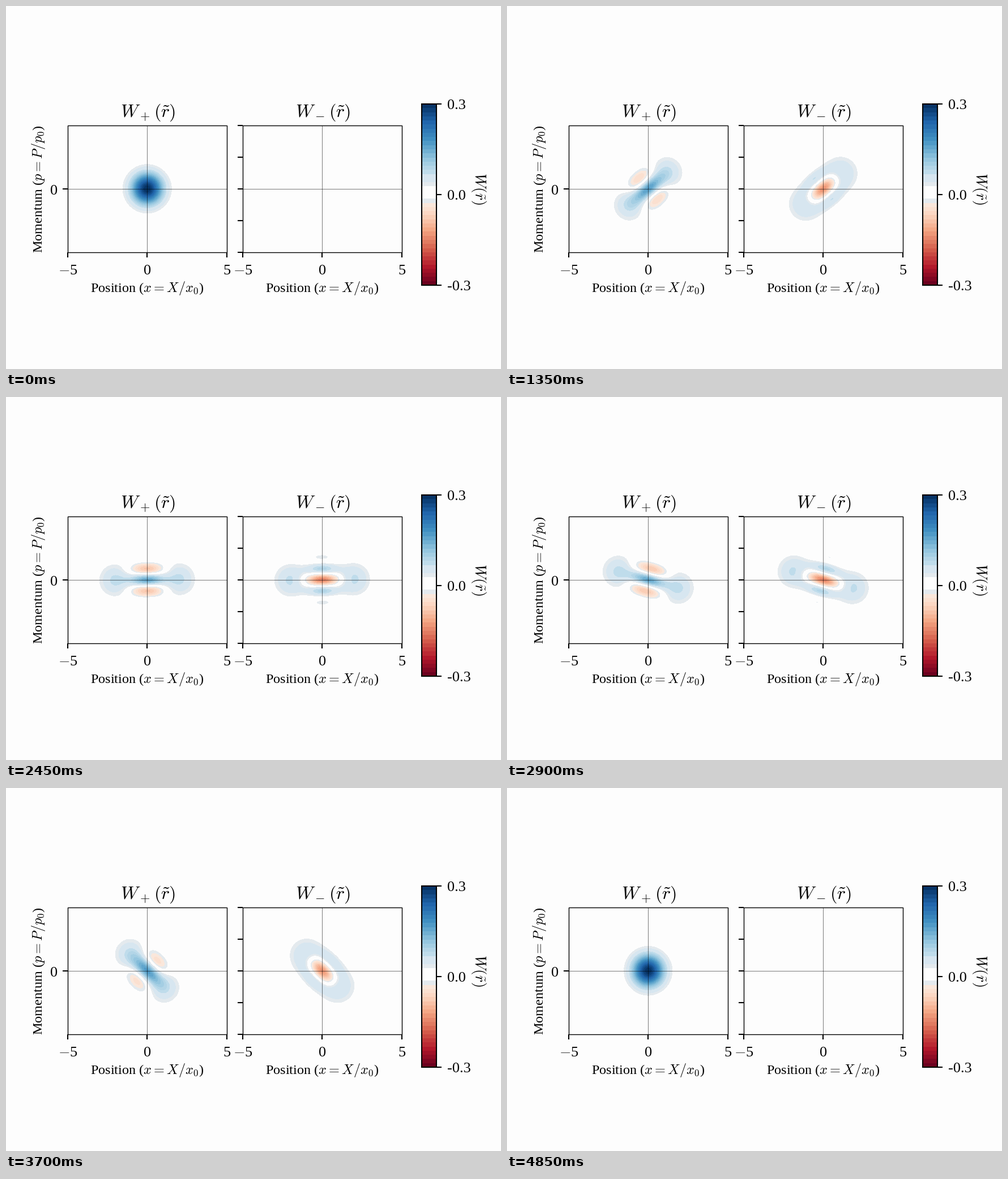
Write a matplotlib script that moves like this. It is 874 by 641 pixels and loops after 5000 ms.

```python
import numpy as np
import matplotlib.pyplot as plt
from matplotlib.animation import FuncAnimation
from matplotlib.patches import Rectangle

WIDTH, HEIGHT, DPI = 874, 641, 100
FRAMES, INTERVAL = 100, 50
PAPER = "#fdfdfd"
PANEL_LEFTS = (109, 418)
TOP, PANEL_W, PANEL_H = 210.9, 280.9, 224.5
MID_Y = TOP + PANEL_H / 2
BAR = dict(left=734, top=173, width=26, height=320)
BANDS = 44
PEAK = 1 / np.pi

plt.rcParams.update({
    "font.family": "Liberation Serif",
    "mathtext.fontset": "cm",
})


def band_colour(k):
    """Colour of band k, where band 0 starts at zero."""
    if -1 <= k <= 1:
        return 253, 253, 253
    if k in (-2, 2):
        return 228, 234, 238
    if k in (3, 4):
        return 215, 230, 240
    return plt.cm.RdBu(0.5 + (k + 0.5) / BANDS, bytes=True)[:3]


HALF = BANDS // 2
COLOURS = np.array([band_colour(k) for k in range(-HALF, HALF)],
                   dtype=np.uint8)


def shade(w):
    index = np.floor((w + PEAK) / (2 * PEAK) * BANDS).astype(int)
    return COLOURS[np.clip(index, 0, BANDS - 1)]


def cell_centres(limit, count):
    return (np.arange(count) + 0.5) / count * 2 * limit - limit


X, P = np.meshgrid(cell_centres(5, 562), cell_centres(4, 450))
VACUUM = PEAK * np.exp(-X**2 - P**2)


def gauss(x0, p0):
    return PEAK * np.exp(-(X - x0)**2 - (P - p0)**2)


def wigner_pair(theta):
    """Even and odd superposition of two opposite coherent states."""
    x0, p0 = 1 - np.cos(theta), np.sin(theta)
    lobes = (gauss(x0, p0) + gauss(-x0, -p0)) / 4
    fringes = VACUUM * np.cos(2 * (x0 * P - p0 * X)) / 2
    return lobes + fringes, lobes - fringes


fig = plt.figure(figsize=(WIDTH / DPI, HEIGHT / DPI), dpi=DPI,
                 facecolor=PAPER)


def add_panel(left):
    ax = fig.add_axes([left / WIDTH, 1 - (TOP + PANEL_H) / HEIGHT,
                       PANEL_W / WIDTH, PANEL_H / HEIGHT])
    ax.axis("off")
    return ax.imshow(shade(VACUUM * 0), extent=(-5, 5, -4, 4),
                     origin="lower", aspect="auto", interpolation="nearest")


images = [add_panel(left) for left in PANEL_LEFTS]

# Fixed parts are laid out in pixels, y pointing down
page = fig.add_axes([0, 0, 1, 1])
page.set(xlim=(0, WIDTH), ylim=(HEIGHT, 0))
page.axis("off")


def line(x, y, width=1.5, **style):
    style.setdefault("color", "black")
    page.plot(x, y, lw=width, solid_capstyle="butt", **style)


def box(left, top, width, height, lw):
    page.add_patch(Rectangle((left, top), width, height, fill=False,
                             ec="black", lw=lw))


def label(x, y, text, size=19, ha="center", rotation=0):
    page.text(x, y, text, fontsize=size, ha=ha, va="baseline",
              rotation=rotation, rotation_mode="anchor")


def draw_frame(left, sign):
    right, bottom = left + PANEL_W, TOP + PANEL_H
    mid = left + PANEL_W / 2
    line([left, right], [MID_Y, MID_Y], 0.75, alpha=0.5)
    line([mid, mid], [TOP, bottom], 0.75, alpha=0.5)
    box(left, TOP, PANEL_W, PANEL_H, 1)
    for x, text in ((left, "$-$5"), (mid, "0"), (right, "5")):
        line([x, x], [bottom, bottom + 9])
        label(x + 0.5, 474, text)
    label(mid, 505, "Position ($x = X/x_0$)", 17.5)
    label(mid + 1, 196, rf"$W_{sign}\hspace{{0.06}}(\tilde{{r}})$", 23)


for left, sign in zip(PANEL_LEFTS, "+-"):
    draw_frame(left, sign)

line([PANEL_LEFTS[0] - 9, PANEL_LEFTS[0]], [MID_Y, MID_Y])
label(84.5, 333, "0")
for y in np.linspace(TOP, TOP + PANEL_H, 5):
    line([PANEL_LEFTS[1] - 9, PANEL_LEFTS[1]], [y, y])
label(64.5, MID_Y, "Momentum ($p = P/p_0$)", 17.5, rotation=90)

# Colour bar
band_h = BAR["height"] / BANDS
for i, colour in enumerate(COLOURS[::-1]):
    page.add_patch(Rectangle((BAR["left"], BAR["top"] + i * band_h),
                             BAR["width"], band_h, fc=colour / 255,
                             lw=0, antialiased=False))
box(BAR["left"], BAR["top"], BAR["width"], BAR["height"], 1.5)
bar_right = BAR["left"] + BAR["width"]
for y, text in zip((173, 333, 493), ("0.3", "0.0", "-0.3")):
    line([bar_right, bar_right + 9], [y, y])
    label(779, y + 9, text, ha="left")
label(828, 322.5, r"$W(\tilde{r})$", 19, rotation=270)


def update(frame):
    # The pose rests briefly at both ends of the loop
    step = 0 if frame < 3 else min(frame, FRAMES - 3)
    theta = 2 * np.pi * step / (FRAMES - 1)
    for image, w in zip(images, wigner_pair(theta)):
        image.set_data(shade(w))
    return images


anim = FuncAnimation(fig, update, frames=FRAMES, interval=INTERVAL,
                     repeat=True, repeat_delay=0, blit=False)
plt.show()
```
